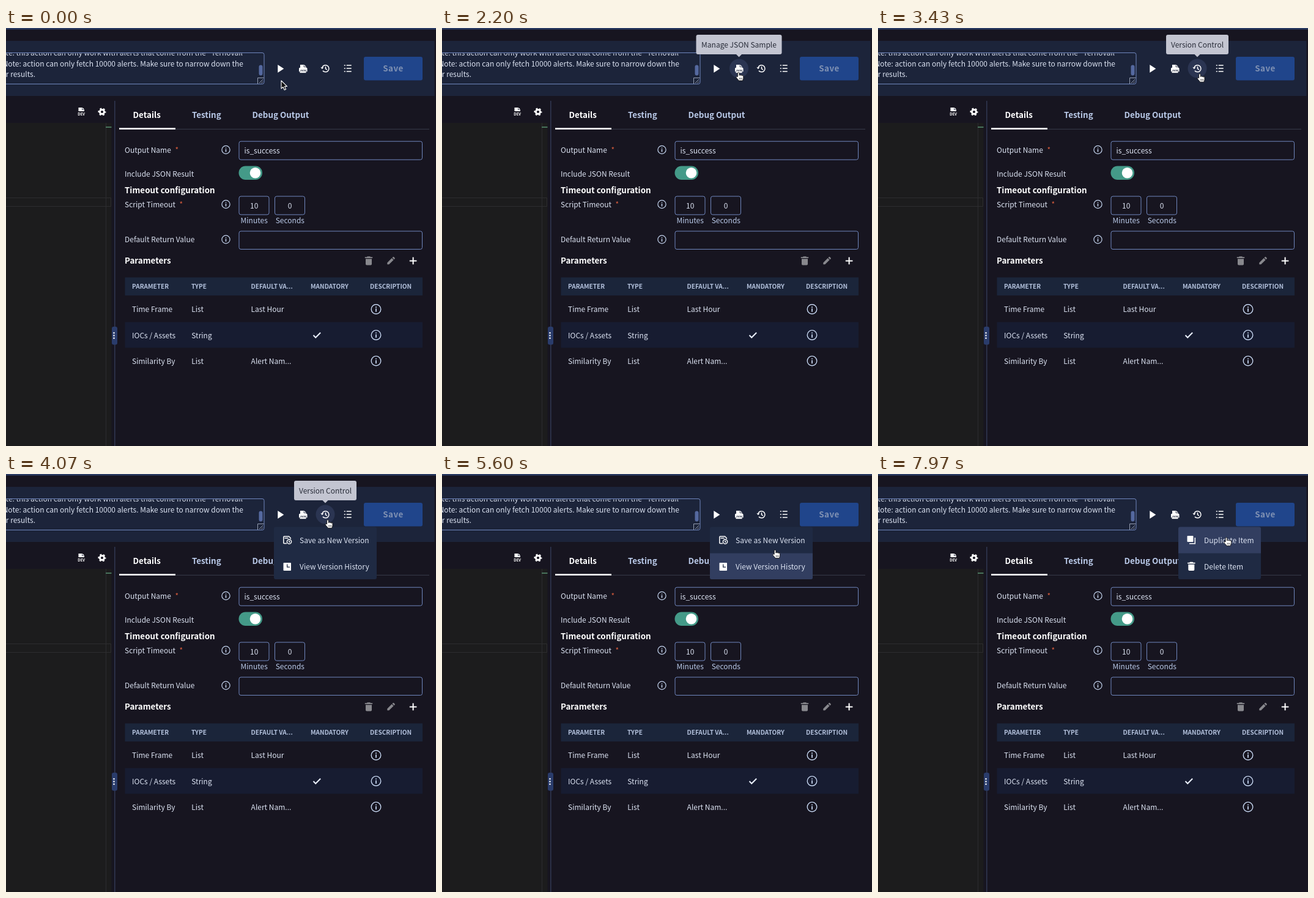
Animation, 703 px wide and 683 px high, one loop 8000 ms. Source, as an HTML page:

```html
<!DOCTYPE html>
<html lang="en">
<head>
<meta charset="utf-8">
<title>Action editor toolbar</title>
<style>
html, body { margin: 0; width: 100%; height: 100%; overflow: hidden; background: #171520; }
svg { display: block; }
text { font: 12px "Noto Sans CJK SC", "Noto Sans CJK JP", "Noto Sans CJK", "Noto Sans", sans-serif; fill: #dce3f2; }
.bold { font-size: 13.4px; font-weight: 700; }
.tab { fill: #b9c9e8; }
.white { fill: #fff; }
.head text { font-size: 10.1px; font-weight: 700; fill: #b3c1dc; }
.mid { text-anchor: middle; }
.end { text-anchor: end; }
.box { fill: none; stroke: #7087be; }
.line { fill: none; stroke: #fff; stroke-width: 1.5; }
.star { fill: #e2603f; }
.tip rect, .tip path { fill: #c3c5d1; }
.tip text { fill: #282c38; text-anchor: middle; }
.tip, .menu { transform-box: view-box; }
</style>
</head>
<body>
<svg width="703" height="683" viewBox="0 0 703 683">
  <defs>
    <clipPath id="noteClip"><rect y="41.5" width="410" height="49"/></clipPath>
    <g id="info" fill="none" stroke="#c5d5ef" stroke-width="1.2">
      <circle r="6.6"/><path d="M0-1V3.6M0-3.6V-2.2" stroke-width="1.5"/>
    </g>
    <path id="trash" d="M-6.2-6.2h3l1-1h4.4l1 1h3v1.7H-6.2ZM-5-3.2H5V5.2Q5 7 3.2 7H-3.2Q-5 7-5 5.2Z"/>
    <g id="doc">
      <path d="M-4.5-6.5H2L5-3.5V-.5H-4.5Z" fill="#fff"/>
      <path d="M1.5-6V-3H4.6" fill="none" stroke="#1d2439" stroke-width=".8"/>
    </g>
    <g id="clock" class="line">
      <path d="M-5-1.5A5.6 5.6 0 1 1-4.1 3.7M.5-3V.6L3 2.1"/>
      <path d="M-7.6-1.7h5L-5.1 1.3Z" fill="#fff" stroke="none"/>
    </g>
  </defs>

  <rect width="703" height="683" fill="#171520"/>
  <rect width="703" height="2.5" fill="#293a62"/>
  <rect y="21" width="700.5" height="90" fill="#1c243a"/>

  <!-- Description field -->
  <path class="box" d="M-2 40.5H419Q422 40.5 422 43.5V88.5Q422 91.5 419 91.5H-2"/>
  <g clip-path="url(#noteClip)">
    <text class="end" x="387" y="45">Note: this action can only work with alerts that come from the "Ternovail</text>
    <text class="end" x="388" y="62.5">Note: action can only fetch 10000 alerts. Make sure to narrow down the</text>
    <text class="end" x="48" y="80">for results.</text>
  </g>
  <rect x="413.5" y="60.5" width="6" height="17" rx="3" fill="#55699f"/>
  <path d="M411.5 91V81.5H421.5M414 90l6-6M417.5 90l2.5-2.5" fill="none" stroke="#a5adbf" stroke-width=".9"/>

  <!-- Toolbar -->
  <circle id="hover" cy="66" r="15.5" fill="#2b3552"/>
  <path d="M444.3 60V73L454.3 66.5Z" fill="#fff"/>
  <use href="#doc" x="485.5" y="66.5"/>
  <path d="M479 66.2q0-1.5 1.5-1.5h10.5q1.5 0 1.5 1.5v5h-2v2h-10v-2H479Z" fill="#fff"/>
  <text class="mid" x="485.7" y="70.5" style="font-size:4px;font-weight:700;fill:#1d2439">JSON</text>
  <use href="#clock" x="522" y="66"/>
  <path class="line" d="M552.8 61h2M552.8 66h2M552.8 71h2M556.7 61h8M556.7 66h8M556.7 71h8"/>
  <rect x="585" y="47" width="96" height="38.5" rx="3" fill="#20458b"/>
  <text class="bold mid" x="633" y="71.3" style="fill:#7f91b3;letter-spacing:.4px">Save</text>

  <!-- Code pane -->
  <use href="#doc" x="123" y="136.5"/>
  <text class="mid bold white" x="123.2" y="143.2" style="font-size:6px">DEV</text>
  <circle cx="157" cy="137" r="3.6" fill="none" stroke="#fff" stroke-width="3"/>
  <circle cx="157" cy="137" r="5.5" fill="none" stroke="#fff" stroke-width="2" stroke-dasharray="2.88" stroke-dashoffset="1.44"/>
  <rect y="155" width="172.5" height="528" fill="#1c1c1d"/>
  <path d="M163.5 155V683M0 277.5H171.5V291.5H0" fill="none" stroke="#2d2d2f"/>
  <path d="M163 162h9.5" stroke="#4e7d64" stroke-width="1.8"/>
  <path d="M177.8 119V683" stroke="#303650" stroke-width="1.6"/>
  <rect x="173" y="488" width="9" height="29.5" rx="3" fill="#2a3c6b"/>
  <path d="M176.5 498.2h0M176.5 502.5h0M176.5 506.8h0" stroke="#fff" stroke-width="2.6" stroke-linecap="round"/>

  <!-- Tabs -->
  <text class="bold white" x="207.5" y="147">Details</text>
  <text class="bold tab" x="304" y="147">Testing</text>
  <text class="bold tab" x="402.5" y="147">Debug Output</text>
  <path d="M185 165.3H692" stroke="#3a3c4b"/>
  <path d="M185 164.5H277" stroke="#fff" stroke-width="2.6"/>

  <!-- Form -->
  <text x="194" y="203.7">Output Name</text><text class="star" x="276.5" y="204">*</text>
  <use href="#info" x="359.5" y="199"/>
  <rect class="box" x="381" y="185.2" width="299.5" height="30" rx="3"/>
  <text x="389.5" y="205">is_success</text>
  <text x="194" y="243.3">Include JSON Result</text>
  <rect x="380.5" y="225.5" width="38.5" height="22.5" rx="11.2" fill="#449a88"/>
  <circle cx="407.5" cy="236.8" r="8.8" fill="#fff"/>
  <text class="bold white" x="194" y="270">Timeout configuration</text>
  <text x="194" y="292.7">Script Timeout</text><text class="star" x="283.5" y="293">*</text>
  <use href="#info" x="359.5" y="288"/>
  <rect class="box" x="381" y="275" width="49" height="30" rx="3"/>
  <rect class="box" x="439.5" y="275" width="49" height="30" rx="3"/>
  <text class="mid" x="405.7" y="294.7">10</text>
  <text class="mid" x="464" y="294.7">0</text>
  <text class="mid tab" x="405.7" y="318.5">Minutes</text>
  <text class="mid tab" x="464.3" y="318.5">Seconds</text>
  <text x="194" y="350.3">Default Return Value</text>
  <use href="#info" x="359.5" y="345.5"/>
  <rect class="box" x="381" y="332" width="299.5" height="29.5" rx="3"/>

  <!-- Parameters -->
  <text class="bold white" x="194" y="385.3">Parameters</text>
  <use href="#trash" x="593" y="380.5" fill="#88888d"/>
  <path d="M623.3 386.3V383.4L630.7 376 633.6 378.9 626.2 386.3ZM631.5 375.2l1-1q.8-.7 1.6 0l1.4 1.4q.7.8 0 1.6l-1 1Z" fill="#88888d"/>
  <path d="M659.8 380.4h11.6M665.6 374.6v11.6" stroke="#fff" stroke-width="2"/>
  <rect x="194.5" y="407.5" width="486.5" height="29.5" fill="#1b253a"/>
  <rect x="194.5" y="480.5" width="486.5" height="42" fill="#171c31"/>
  <g class="head">
    <text x="206" y="426">PARAMETER</text><text x="303" y="426">TYPE</text>
    <text x="400.5" y="426">DEFAULT VA...</text><text x="498" y="426">MANDATORY</text>
    <text x="595" y="426">DESCRIPTION</text>
  </g>
  <g id="rows"></g>
  <path d="M502.5 502l3.7 3.8 8-8" fill="none" stroke="#e8eefa" stroke-width="2"/>

  <!-- Menus -->
  <g id="versionMenu" class="menu">
    <rect x="438" y="86.5" width="168" height="85.5" rx="3" fill="#1f2a43"/>
    <path id="historyRow" d="M438 129.5H606V169Q606 172 603 172H441Q438 172 438 169Z" fill="#323e60"/>
    <path class="line" d="M459 113.5H454.8Q453.8 113.5 453.8 112.5V103Q453.8 102 454.8 102H462.5L465.3 104.8V106M455.5 104.7H461.5"/>
    <circle class="line" cx="463" cy="110.5" r="3.6" stroke-width="1.3"/>
    <path class="line" d="M463 108.8v2l1.3.8" stroke-width="1"/>
    <rect x="453.5" y="145" width="12.5" height="13" rx="1" fill="#fff"/>
    <path d="M459.7 147.5V152.2H464" fill="none" stroke="#1f2a43" stroke-width="1.3"/>
    <text x="480" y="112.5">Save as New Version</text>
    <text x="480" y="155.7">View Version History</text>
  </g>
  <g id="itemMenu" class="menu">
    <rect x="491" y="86.5" width="135" height="85.5" rx="3" fill="#1f2a43"/>
    <path id="duplicateRow" d="M491 129.5V89.5Q491 86.5 494 86.5H623Q626 86.5 626 89.5V129.5Z" fill="#323e60"/>
    <path id="deleteRow" d="M491 129.5H626V169Q626 172 623 172H494Q491 172 491 169Z" fill="#323e60"/>
    <rect x="505.5" y="101" width="10" height="10" rx="1" fill="#fff"/>
    <path class="line" d="M509 113.7H518.3V104"/>
    <use href="#trash" x="512.3" y="151" fill="#fff"/>
    <text x="533" y="112.5">Duplicate Item</text>
    <text x="533" y="155.7">Delete Item</text>
  </g>
  <g id="tips"></g>

  <g id="cursor" stroke="#111" stroke-linejoin="round" fill="#fff">
    <path id="arrow" d="M0 0V13L3 10.3 5.2 15.2 7.6 14.2 5.5 9.4H9.5Z" fill="#111" stroke="#fff" stroke-width="1.1"/>
    <g id="hand" stroke-width=".9">
      <path d="M-1.4 7V1.2a1.35 1.35 0 0 1 2.7 0V4.8a1.2 1.2 0 0 1 2.4.2a1.15 1.15 0 0 1 2.3.5a1 1 0 0 1 2 .6V9c0 1.6-1 2.3-1 4.3H.2c0-1.6-3.1-3.4-3.9-5.4c-.4-1.3 1-1.9 1.7-1.2Z"/>
      <path d="M1.7 8.6v2.6M3.6 8.6v2.6M5.5 8.6v2.6" stroke-width=".7"/>
    </g>
  </g>
</svg>
<script>
const LOOP = 8000;
const $ = id => document.getElementById(id);
const clamp = v => Math.max(0, Math.min(1, v));
const show = (id, on) => $(id).setAttribute('visibility', on ? 'inherit' : 'hidden');

const rows = [['Time Frame', 'List', 'Last Hour'], ['IOCs / Assets', 'String', ''], ['Similarity By', 'List', 'Alert Nam...']];
$('rows').innerHTML = rows.map((cells, r) => {
  const y = 464.3 + r * 42.2;
  return cells.map((cell, c) => `<text x="${206 + c * 97.3}" y="${y}">${cell}</text>`).join('') +
    `<use href="#info" transform="translate(605 ${y - 4.8}) scale(1.18)"/>`;
}).join('');

const tips = [
  { label: 'Play Item', x: 449, width: 68, from: 480, to: 1740 },
  { label: 'Manage JSON Sample', x: 485.5, width: 140, from: 2080, to: 2745 },
  { label: 'Version Control', x: 522, width: 102, from: 3040, to: 4540 }
];
$('tips').innerHTML = tips.map(({ label, x, width }) => `<g class="tip">
  <rect x="${x - width / 2}" y="11" width="${width}" height="32" rx="3"/>
  <path d="M${x - 4.5} 43h9l-4.5 4.5Z"/><text x="${x}" y="31.5">${label}</text></g>`).join('');

// Each stop: time, x, y of the pointer tip; the pointer eases between stops.
const path = [
  [0, 450, 86], [120, 450, 86], [430, 449, 73], [800, 448.5, 72], [1650, 448.5, 72], [2000, 484, 73],
  [2620, 487, 72], [2930, 526, 72], [3500, 526, 75], [4200, 526, 75], [4750, 535, 112],
  [5250, 545, 145], [5450, 545, 141], [5800, 544, 99], [6150, 560, 77], [6420, 561, 82], [6600, 561, 82],
  [6950, 566, 108], [7300, 567, 145], [7480, 567, 145], [7850, 569.5, 104], [8000, 569.5, 104]
];

function pointerAt(t) {
  const i = path.findIndex(stop => stop[0] > t);
  const [t0, x0, y0] = path[i - 1], [t1, x1, y1] = path[i];
  const u = (t - t0) / (t1 - t0), k = u * u * (3 - 2 * u);
  return [x0 + (x1 - x0) * k, y0 + (y1 - y0) * k];
}

function scaleAbout(el, x, y, scale, opacity) {
  el.setAttribute('transform', `translate(${x} ${y}) scale(${scale}) translate(${-x} ${-y})`);
  el.setAttribute('opacity', opacity);
}

function drawMenu(id, x, t, open, close) {
  const p = clamp((t - open) / 150), fade = clamp((close - t) / 100);
  scaleAbout($(id), x, 129.3, 0.8 + 0.2 * p * (2 - p), Math.min(1, p * 4.5) * fade);
  show(id, t > open && t < close);
}

function hoveredButton(t) {
  if (t >= 300 && t < 1760) return 448.5;
  if (t >= 1860 && t < 2830) return 485.5;
  if (t >= 2860 && t < 4560) return 522;
  if (t >= 6080 && t < 6720) return 558.5;
  return 0;
}

function draw(now) {
  const t = now % LOOP;
  const button = hoveredButton(t);
  show('hover', button);
  $('hover').setAttribute('cx', button);

  tips.forEach(({ x, from, to }, i) => {
    const size = Math.min(clamp((t - from) / 100), clamp((to + 130 - t) / 130));
    scaleAbout($('tips').children[i], x, 27, size, Math.min(1, 0.4 + size * 0.75) * (size > 0));
  });

  drawMenu('versionMenu', 522, t, 3620, 6050);
  show('historyRow', t > 4980 && t < 5625);
  drawMenu('itemMenu', 558.5, t, 6452, LOOP + 200);
  show('duplicateRow', t > 6850 && t < 7160 || t > 7680);
  show('deleteRow', t >= 7160 && t <= 7680);

  $('cursor').setAttribute('transform', `translate(${pointerAt(t)})`);
  show('arrow', t < 300);
  show('hand', t >= 300);
}

function tick() {
  draw(performance.now());
  requestAnimationFrame(tick);
}
tick();
</script>
</body>
</html>
```
